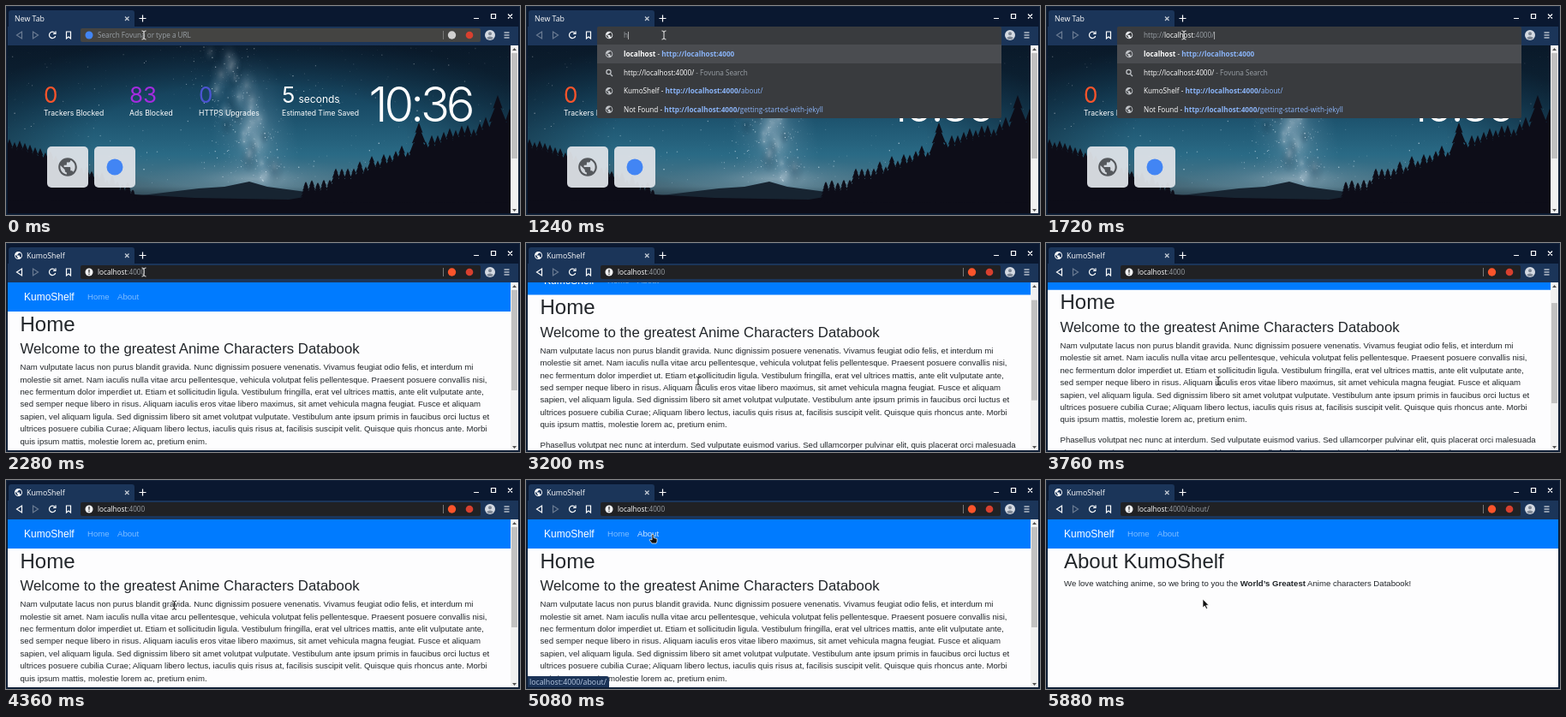
Recreate the animation shown at these times as an HTML page. Size 600 px wide and 244 px high, loop 7440 ms.

```html
<!DOCTYPE html>
<html lang="en">
<head>
<meta charset="utf-8">
<title>Local site in a browser</title>
<style>
  html, body { margin: 0; width: 100%; height: 100%; overflow: hidden; background: #0a1830; }
  svg { display: block; width: 600px; height: 244px; }
  text { white-space: pre; font: 8.2px "Open Sans", "Noto Sans", sans-serif; fill: #fff; }
  .tab { font-size: 8.8px; }
  .site text { font: 9.6px "Liberation Sans", Arial, sans-serif; fill: #212529; }
  .site .h1 { font-size: 24px; }
  .site .h3 { font-size: 16.8px; }
  .site .nav { fill: #fff; fill-opacity: .5; }
  .site .brand { font-size: 12px; fill: #fff; }
  .start text { font: 8.6px Inter, sans-serif; }
  .start .num { font-size: 26px; }
  .start .unit { font-size: 12px; }
  .start .clock { font-size: 56px; font-weight: 300; letter-spacing: -4px; }
  .line { fill: none; stroke: #fff; stroke-width: 1.2; }
  .dim { fill: #9aa0a6; }
  .link { fill: #8ab4f8; }
  .bold { font-weight: 700; }
</style>
</head>
<body>
<svg viewBox="0 0 600 244">
  <defs>
    <path id="globe" transform="translate(-12 -12)" d="M12 2C6.5 2 2 6.5 2 12s4.5 10 10 10 10-4.5 10-10S17.5 2 12 2zm-1 17.9c-4-.5-7-3.8-7-7.9 0-.6.1-1.2.2-1.8L9 15v1c0 1.100.9 2 2 2v1.9zm6.9-2.5c-.3-.8-1-1.4-1.9-1.4h-1v-3c0-.6-.4-1-1-1H8v-2h2c.6 0 1-.4 1-1V7h2c1.1 0 2-.9 2-2v-.4c2.9 1.2 5 4 5 7.4 0 2.1-.8 4-2.1 5.4z"/>
    <linearGradient id="sky" x2="0" y2="1">
      <stop offset="0" stop-color="#0f2c42"/>
      <stop offset=".35" stop-color="#184a65"/>
      <stop offset=".65" stop-color="#2a6a85"/>
      <stop offset=".84" stop-color="#4f7585"/>
      <stop offset="1" stop-color="#1b2733"/>
    </linearGradient>
    <radialGradient id="glow">
      <stop offset="0" stop-color="#c3d2dc" stop-opacity=".6"/>
      <stop offset=".5" stop-color="#7fa3b8" stop-opacity=".26"/>
      <stop offset="1" stop-color="#5f8ba5" stop-opacity="0"/>
    </radialGradient>
    <radialGradient id="dust">
      <stop offset="0" stop-color="#123247" stop-opacity=".5"/>
      <stop offset="1" stop-color="#123247" stop-opacity="0"/>
    </radialGradient>
    <radialGradient id="shade" cx=".48" cy=".55" r=".62">
      <stop offset=".5" stop-color="#060c18" stop-opacity="0"/>
      <stop offset="1" stop-color="#060c18" stop-opacity=".6"/>
    </radialGradient>
    <clipPath id="view"><path d="M2 46H598V242H2z"/></clipPath>
  </defs>

  <rect width="600" height="244" fill="#0a1830"/>

  <g clip-path="url(#view)">
    <g id="start" class="start">
      <path fill="url(#sky)" d="M2 46H589V242H2z"/>
      <ellipse cx="290" cy="150" rx="50" ry="100" fill="url(#glow)" opacity=".7" transform="rotate(-9 290 150)"/>
      <ellipse cx="290" cy="202" rx="130" ry="26" fill="url(#glow)" opacity=".7"/>
      <g id="clouds"></g>
      <g id="stars" fill="#dcecf5"></g>
      <path fill="url(#shade)" d="M2 46H589V242H2z"/>
      <path fill="#172431" d="M150 222L225 213 255 211 284 205 305 211 350 217 400 225V242H150z"/>
      <path fill="#0d0d18" d="M2 175L60 198 150 220 220 224 330 226 390 216 455 198 520 176 589 150V242H2z"/>
      <path id="trees" fill="#0d0d18"/>
      <text class="num" x="44" y="113" style="fill:#fb542b">0</text>
      <text class="num" x="144" y="113" style="fill:#a52be0">83</text>
      <text class="num" x="225" y="113" style="fill:#4c54d2">0</text>
      <text class="num" x="322" y="113">5</text>
      <text class="unit" x="341.5" y="113">seconds</text>
      <text x="44" y="127.5">Trackers Blocked</text>
      <text x="144" y="127.5">Ads Blocked</text>
      <text x="225" y="127.5">HTTPS Upgrades</text>
      <text x="322" y="127.5">Estimated Time Saved</text>
      <text class="clock" x="423.5" y="135">10:36</text>
      <g fill="#dfe3e8" fill-opacity=".94">
        <rect x="48" y="164" width="48" height="48" rx="5"/>
        <rect x="103" y="164" width="48" height="48" rx="5"/>
      </g>
      <use href="#globe" transform="translate(72 188) scale(1.08)" fill="#55585c"/>
      <circle cx="127" cy="188" r="9.5" fill="#4285f4"/>
    </g>

    <g id="site" class="site">
      <path fill="#fdfdfe" d="M2 46H598V360H2z"/>
      <path fill="#007bff" d="M2 46H598V80H2z"/>
      <text class="brand" x="21" y="67.3">KumoShelf</text>
      <text class="nav" x="95" y="66.3">Home</text>
      <text class="nav" id="aboutLink" x="130" y="66.3">About</text>
      <g id="home">
        <text class="h1" x="16.5" y="102.5">Home</text>
        <text class="h3" x="16.5" y="129">Welcome to the greatest Anime Characters Databook</text>
      </g>
      <g id="about">
        <text class="h1" x="21" y="102.5">About KumoShelf</text>
        <text x="21" y="123.5">We love watching anime, so we bring to you the <tspan class="bold">World’s Greatest</tspan> Anime characters Databook!</text>
      </g>
    </g>

    <g id="scrollbar">
      <path fill="#f1f1f1" d="M589 46H598V242H589z"/>
      <path fill="#505050" d="M591 52l2.5-3 2.5 3zM591 237l2.5 3 2.5-3z"/>
      <rect id="thumb" x="590" width="7" fill="#c1c1c1"/>
    </g>
    <g id="status">
      <path fill="#1b3357" d="M0 229H94q3 0 3 3V244H0z"/>
      <text x="4" y="239" style="font-size:8.8px;fill:#b8c9e2">localhost:4000/about/</text>
    </g>
  </g>

  <path fill="#1b3559" d="M2 24H3V8q0-3 3-3H147q3 0 3 3V24H598V46H2z"/>
  <text id="title" class="tab" y="17.5"></text>
  <use id="tabIcon" href="#globe" transform="translate(14.5 14.5) scale(.45)" fill="#fff"/>
  <circle id="spinner" cx="14.5" cy="14.5" r="4" class="line" stroke-dasharray="17 9" style="stroke:#8ab4f8"/>
  <path class="line" d="M139 12.5l4.5 4.5m0-4.5l-4.5 4.5" stroke-opacity=".75"/>
  <path class="line" d="M155.5 14.5h8m-4-4v8M546 14.500h6M566.5 9.500h5v5h-5zM586 9.500l5 5m0-5l-5 5"/>
  <path id="back" class="line" d="M12.5 34l6-4v8z"/>
  <path class="line" d="M37.5 34l-6-4v8z" opacity=".35"/>
  <path class="line" d="M57 31.5a3.7 3.7 0 1 0 .7 3.5M58 29.5v3h-3"/>
  <path class="line" d="M70.5 30h5v8l-2.5-2-2.5 2z"/>
  <rect id="field" x="87" y="26" width="467" height="16" rx="2"/>
  <path stroke="#777" d="M510.5 29V39"/>
  <circle id="shield" cx="520.5" cy="34" r="4.7"/>
  <circle cx="541" cy="34" r="4.3" fill="#d8402f"/>
  <circle cx="565" cy="34" r="6" fill="#d5dae2"/>
  <path fill="#7d8795" d="M561 37.5q4-4 8 0-4 3-8 0z"/>
  <circle cx="565" cy="32.2" r="2" fill="#7d8795"/>
  <path class="line" d="M581.5 31h6m-6 3h6m-6 3h6"/>

  <circle id="engine" cx="97" cy="34" r="4.5" fill="#4285f4"/>
  <g id="info">
    <circle cx="97" cy="34" r="4.5" fill="#f1f1f1"/>
    <path d="M97 31V34.8M97 35.7V37" stroke="#222" stroke-width="1.2"/>
  </g>
  <text id="address" x="107" y="37"></text>

  <g id="popup">
    <rect x="83" y="24" width="472" height="107" rx="2" fill="#393b3e"/>
    <path fill="#4a4c50" d="M83 45H555V67H83z"/>
    <use href="#globe" transform="translate(97 34) scale(.43)" fill="#e8eaed"/>
    <text id="typed" x="114" y="37"></text>
    <g id="rows" fill="#c4c7cb"></g>
    <path class="line" d="M98.5 79.5l2.5 2.5" style="stroke:#c4c7cb"/>
    <circle class="line" cx="96.5" cy="77" r="2.6" style="stroke:#c4c7cb"/>
  </g>

  <path fill="none" stroke="#14253b" d="M.5 .5H599.5V243.5H.5z"/>

  <g id="pointer" stroke-linejoin="round">
    <path id="beam" fill="none" d="M-2.5-5Q0-5 0-3.5 0-5 2.5-5M0-4V4M-2.5 5Q0 5 0 3.5 0 5 2.5 5"/>
    <path id="arrow" fill="#111" stroke="#fff" stroke-width=".7" d="M0 0V10L2.3 8 4 11.5 5.6 10.8 4 7.3H7z"/>
    <path id="hand" fill="#111" stroke="#fff" stroke-width=".7" d="M-1 1Q0-1 1 1V4.5L5 5.5V9L4 11H-1L-4 7Q-4 5-1 7z"/>
  </g>
</svg>

<script>
const LOOP = 7440, STEP = 40, MAX_SCROLL = 104;
const $ = id => document.getElementById(id);
const show = (id, on) => $(id).setAttribute('visibility', on ? 'inherit' : 'hidden');
const span = (text, cls = '') => `<tspan class="${cls}">${text}</tspan>`;

let seed = 7;
const random = () => (seed = seed * 16807 % 2147483647) / 2147483647;

// Milky way: a leaning band of bright and dark clouds, with denser stars
const bandX = y => 245 + (y - 46) * .35;
let clouds = '', stars = '';
for (let i = 0; i < 36; i++) {
  const y = 50 + i * 4.3, x = bandX(y) + (random() - .5) * 46, r = 8 + random() * 16;
  clouds += `<ellipse cx="${x}" cy="${y}" rx="${r * .7}" ry="${r}" fill="url(#${i % 3 ? 'glow' : 'dust'})" opacity=".6"/>`;
}
for (let i = 0; i < 800; i++) {
  const y = 47 + random() * 160;
  const x = i % 2 ? 2 + random() * 587 : bandX(y) + (random() + random() - 1) * 55;
  stars += `<circle cx="${x}" cy="${y}" r="${.2 + random() ** 3 * .6}" opacity="${.25 + random() * .6}"/>`;
}
$('clouds').innerHTML = clouds;
$('stars').innerHTML = stars;

// Conifers rise towards both edges
function tree(x, top, height) {
  let right = '', left = '';
  for (let i = 1; i < 8; i++) {
    const y = top + i * height / 7, w = 1 + i * height / 24;
    right += `L${x + w} ${y}L${x + w * .6} ${y - 1}`;
    left = `L${x - w * .6} ${y - 1}L${x - w} ${y}` + left;
  }
  return `M${x} ${top}${right}${left}z`;
}
let forest = '';
for (let x = 350; x < 590; x += 7) {
  const top = 214 - (x - 350) * .36 - random() * 14;
  forest += tree(x, top, 230 - top);
}
for (let x = 4; x < 150; x += 6) {
  const top = 156 + x * .4 - random() * 8;
  forest += tree(x, top, 228 - top);
}
forest += tree(482, 136, 85) + tree(574, 104, 110);
$('trees').setAttribute('d', forest);

// Home page text
const paragraphs = [[
  'Nam vulputate lacus non purus blandit gravida. Nunc dignissim posuere venenatis. Vivamus feugiat odio felis, et interdum mi',
  'molestie sit amet. Nam iaculis nulla vitae arcu pellentesque, vehicula volutpat felis pellentesque. Praesent posuere convallis nisi,',
  'nec fermentum dolor imperdiet ut. Etiam et sollicitudin ligula. Vestibulum fringilla, erat vel ultrices mattis, ante elit vulputate ante,',
  'sed semper neque libero in risus. Aliquam iaculis eros vitae libero maximus, sit amet vehicula magna feugiat. Fusce et aliquam',
  'sapien, vel aliquam ligula. Sed dignissim libero sit amet volutpat vulputate. Vestibulum ante ipsum primis in faucibus orci luctus et',
  'ultrices posuere cubilia Curae; Aliquam libero lectus, iaculis quis risus at, facilisis suscipit velit. Quisque quis rhoncus ante. Morbi',
  'quis ipsum mattis, molestie lorem ac, pretium enim.'
], [
  'Phasellus volutpat nec nunc at interdum. Sed vulputate euismod varius. Sed ullamcorper pulvinar elit, quis placerat orci malesuada',
  'vitae. Donec sit amet mauris at lectus gravida tempor. Nulla facilisi. Integer vitae sapien non ligula posuere luctus. Praesent at',
  'mauris in neque tempus dictum. Curabitur quis lorem nec arcu feugiat aliquet. Aenean vel justo sed nibh rutrum porta in eget',
  'turpis. Suspendisse potenti. Etiam a libero vel massa varius finibus. Duis et erat id nisl consequat ornare. Maecenas semper',
  'justo eu lorem viverra, at tincidunt risus feugiat. Vivamus sit amet nulla quis metus pharetra dapibus. Nam non odio nec arcu',
  'volutpat semper.'
]];
paragraphs.forEach((lines, p) => lines.forEach((line, i) => {
  $('home').insertAdjacentHTML('beforeend',
    `<text x="16.5" y="${(p ? 258.6 : 148.2) + i * 14.4}">${line}</text>`);
}));

// Suggestions
const url = 'http://localhost:4000';
const suggestions = [
  span('localhost', 'bold') + ' - ' + span(url, 'link bold'),
  url + '/' + span(' - Fovuna Search', 'dim'),
  'KumoShelf - ' + span(url + '/', 'link bold') + span('about/', 'link'),
  'Not Found - ' + span(url + '/', 'link bold') + span('getting-started-with-jekyll', 'link')
];
$('rows').innerHTML = suggestions.map((row, i) => {
  const y = 56 + i * 21.6;
  const icon = i === 1 ? '' : `<use href="#globe" transform="translate(97 ${y}) scale(.43)"/>`;
  return `${icon}<text x="114" y="${y + 3}">${row}</text>`;
}).join('');

// Pointer stops: time, x, y
const path = [
  [0, 161, 34], [2600, 161, 34], [2880, 201, 161], [4080, 201, 161], [4120, 199, 150],
  [4280, 199, 150], [4840, 153, 82], [4960, 153, 82], [5080, 148, 63], [5480, 148, 63],
  [5880, 183, 139], [LOOP, 183, 139]
];
function pointerAt(t) {
  const i = path.findIndex(stop => stop[0] > t);
  const [t0, x0, y0] = path[i - 1], [t1, x1, y1] = path[i];
  const p = (t - t0) / (t1 - t0), e = p * p * (3 - 2 * p);
  return [x0 + (x1 - x0) * e, y0 + (y1 - y0) * e];
}

const progress = (t, start, length) => Math.min(1, Math.max(0, (t - start) / length));
const glide = p => 1 - (1 - p) ** 1.55;
const scrollAt = t => MAX_SCROLL * (glide(progress(t, 3160, 320)) - glide(progress(t, 3640, 200)));

function typedText(t) {
  const count = t < 1280 ? 1 : t < 1520 ? 2 : 2 + Math.round(20 * progress(t, 1480, 240));
  const full = url + '/', cut = (a, b) => full.slice(a, Math.min(b, count));
  return span(cut(0, 7), 'dim') + cut(7, 16) + span(cut(16, 22), 'dim') + '<tspan dx="-1.8">|</tspan>';
}

function draw(t) {
  const popup = t >= 1240 && t < 1960, visited = t >= 1960;
  const home = t >= 2160, about = t >= 5440;
  const loading = visited && t < 2240 || t >= 5240 && t < 5560;
  const scroll = scrollAt(t);
  const [x, y] = pointerAt(t);
  const hover = x > 128 && x < 158 && y > 55 && y < 72;

  show('start', !home);
  show('site', home);
  show('home', home && !about);
  show('about', about);
  show('scrollbar', !about);
  show('status', hover && !about);
  $('site').setAttribute('transform', `translate(0 ${-scroll})`);
  $('aboutLink').style.fillOpacity = hover ? .8 : .5;
  $('thumb').setAttribute('y', 55 + scroll * .6);
  $('thumb').setAttribute('height', home ? 117 : 123);

  $('title').textContent = home ? 'KumoShelf' : visited ? 'localhost:4000' : 'New Tab';
  $('title').setAttribute('x', visited ? 24 : 10);
  show('tabIcon', visited && !loading);
  show('spinner', loading);
  $('spinner').setAttribute('transform', `rotate(${t * .45} 14.5 14.5)`);
  $('back').setAttribute('opacity', home ? 1 : .35);

  $('field').setAttribute('fill', visited ? '#202124' : '#444442');
  $('shield').setAttribute('fill', home ? '#fb542b' : '#d0d0d0');
  show('engine', !visited);
  show('info', visited);
  $('address').innerHTML = visited
    ? 'localhost' + span(about ? ':4000/about/' : ':4000', 'dim')
    : span('Search Fovuna or type a URL', 'dim');
  show('popup', popup);
  if (popup) $('typed').innerHTML = typedText(t);

  const beam = y < 46 || y > 112 && !about;
  $('pointer').setAttribute('transform', `translate(${x} ${y})`);
  show('beam', beam);
  $('beam').setAttribute('stroke', y < 46 ? '#e8e8e8' : '#222');
  show('hand', hover);
  show('arrow', !beam && !hover);
}

function tick() {
  draw(Math.floor(performance.now() / STEP) * STEP % LOOP);
  requestAnimationFrame(tick);
}
tick();
</script>
</body>
</html>
```
